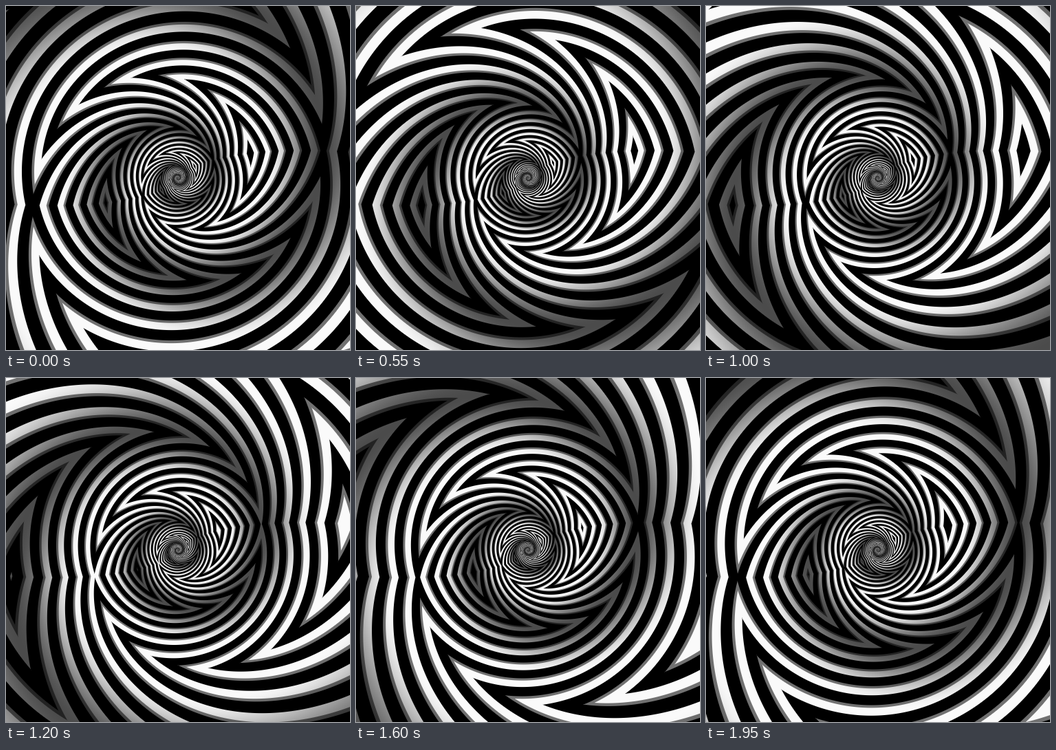
Animation of 500x500 px, one loop 2 s. Source, as an HTML page with a canvas:

```html
<!DOCTYPE html>
<html lang="en">
<head>
<meta charset="utf-8">
<title>Spiral zoom</title>
<style>
html, body { margin: 0; width: 100%; height: 100%; overflow: hidden; background: #000; }
canvas { display: block; width: 500px; height: 500px; }
</style>
</head>
<body>
<canvas id="stage" width="500" height="500"></canvas>
<script>
const SIZE = 500, LOOP = 2000, STEP = 50;
const PERIOD = Math.log(4);            // one zoom level, in log radius
const TWIST = PERIOD / (2 * Math.PI);
const EYE_RADIUS = 111, EYE_ANGLE = -0.331;
const ACROSS = 5, AROUND = 6;          // stripes per half period
const CYCLES = 4, PHASE = 0.1;
const DENSITY = Math.hypot(2 * ACROSS / PERIOD, AROUND / Math.PI) * Math.hypot(1, TWIST);

const ctx = document.getElementById('stage').getContext('2d');
const image = ctx.createImageData(SIZE, SIZE);
const pixels = new Uint32Array(image.data.buffer);
const level = new Float32Array(SIZE * SIZE);
const ring = new Float32Array(SIZE * SIZE);
const blur = new Float32Array(SIZE * SIZE);

// Triangle wave: 0 at whole numbers, 1 halfway between
const tri = v => 2 * Math.abs(v - Math.round(v));

// Twisted log-polar coordinates of every pixel
for (let i = 0; i < level.length; i++) {
  const x = i % SIZE + 0.5 - SIZE / 2;
  const y = Math.floor(i / SIZE) + 0.5 - SIZE / 2;
  const r = Math.hypot(x, y);
  const u = Math.log(r / EYE_RADIUS);
  const a = Math.atan2(y, x) - EYE_ANGLE;
  level[i] = (u + TWIST * a) / PERIOD;
  ring[i] = AROUND * tri((a - TWIST * u) / (2 * Math.PI));
  blur[i] = Math.max(0.02, DENSITY / r);
}

// Running integral of the stripe profile: black, white, grey edge, black
const WHITE = 0.25, GREY = 0.62, END = 0.75, GREY_TONE = 0.45;
const TOTAL = GREY - WHITE + (END - GREY) * GREY_TONE;
function integral(p) {
  const n = Math.floor(p), q = p - n;
  let s = n * TOTAL;
  if (q > WHITE) s += Math.min(q, GREY) - WHITE;
  if (q > GREY) s += (Math.min(q, END) - GREY) * GREY_TONE;
  return s;
}

function tone(t) {
  const s = Math.max(0, (t - 0.3) / 0.7);
  return 250 - 175 * s * s * (3 - 2 * s);
}

function draw(time) {
  const k = time / LOOP;
  const shift = CYCLES * k - PHASE;
  for (let i = 0; i < pixels.length; i++) {
    const t = tri(level[i] - k);
    const p = ACROSS * t + ring[i] + shift;
    const w = blur[i];
    const cover = (integral(p + w / 2) - integral(p - w / 2)) / w;
    const v = Math.round(tone(t) * cover);
    pixels[i] = 0xff000000 | v << 16 | v << 8 | v;
  }
  ctx.putImageData(image, 0, 0);
}

const start = performance.now();
let shown = -1;
function tick() {
  const step = Math.floor((performance.now() - start) % LOOP / STEP);
  if (step !== shown) {
    shown = step;
    draw(step * STEP);
  }
  requestAnimationFrame(tick);
}
tick();
</script>
</body>
</html>
```
